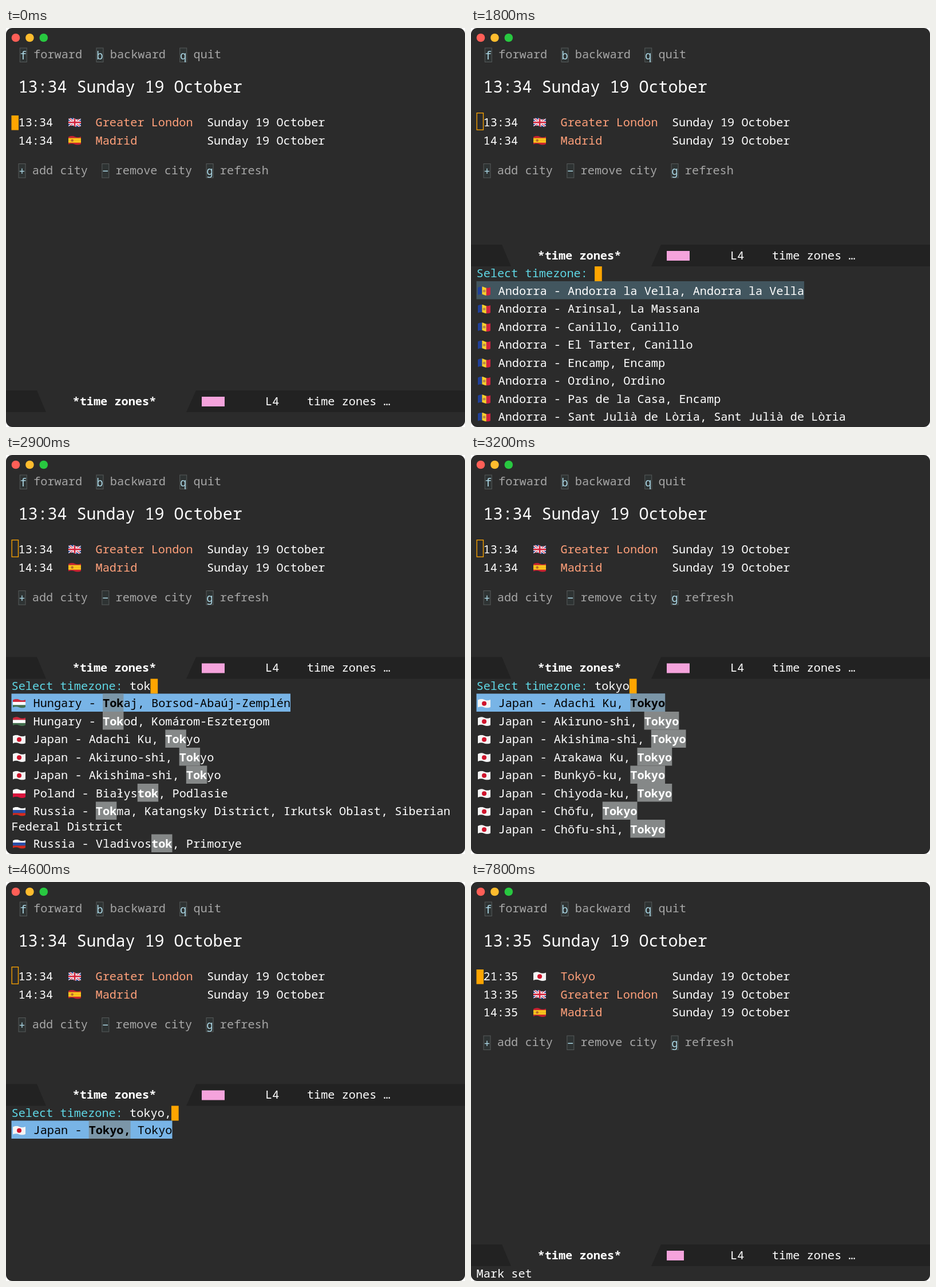
An HTML page that plays this animation: 802 px wide and 698 px high, repeating every 8000 ms.

```html
<!DOCTYPE html>
<html lang="en">
<head>
<meta charset="utf-8">
<title>Time zones</title>
<style>
  html, body { margin: 0; width: 100%; height: 100%; overflow: hidden; background: #fff; }
  svg { display: block; width: 802px; height: 698px; }
  text {
    font: 500 20.25px "Noto Sans Mono", "DejaVu Sans Mono", monospace;
    white-space: pre; fill: #fff; transform: translate(-.5px, -.8px);
  }
  .title { font-size: 28.35px; }
  .dim { fill: #a6a6a6; }
  .key { font-size: 19px; fill: #add8e6; text-anchor: middle; }
  .city { fill: #ffa07a; }
  .prompt { fill: #5fd7e5; }
  .bold { font-weight: bold; }
  .picked { fill: #000; }
</style>
</head>
<body>
<svg id="stage" viewBox="0 0 802 698"></svg>
<script>
const stage = document.getElementById('stage');
const LOOP = 8000, CHAR = 12.15, ROW = 31.5, ORANGE = '#ffa500';

const rect = (x, y, w, h, fill, extra = '') =>
  `<rect x="${x}" y="${y}" width="${w}" height="${h}" fill="${fill}" ${extra}/>`;
const text = (x, y, str, cls = '') => `<text x="${x}" y="${y}" class="${cls}">${str}</text>`;

// Flags are drawn 23 x 17, cut to a waving outline.
const stripes = (colors, vertical) => colors.map((c, i) => {
  const n = colors.length;
  return vertical ? rect(i * 23 / n, 0, 23 / n + .2, 17, c) : rect(0, i * 17 / n, 23, 17 / n + .2, c);
}).join('');
const line = (d, color, width) => `<path d="${d}" stroke="${color}" stroke-width="${width}"/>`;
const dot = (x, r, color) => `<circle cx="${x}" cy="8.5" r="${r}" fill="${color}"/>`;
const flags = {
  GB: rect(0, 0, 23, 17, '#1f3f8f') + line('M0 0 23 17M23 0 0 17', '#fff', 4) +
      line('M0 0 23 17M23 0 0 17', '#d2233c', 1.3) + line('M11.5 0V17M0 8.5H23', '#fff', 5.5) +
      line('M11.5 0V17M0 8.5H23', '#d2233c', 3),
  ES: stripes(['#c8202f', '#fbc31c', '#fbc31c', '#c8202f']) + dot(7, 2.3, '#b5662f'),
  AD: stripes(['#20409a', '#f8cf2c', '#d0233f'], true) + dot(11.5, 2.5, '#b98a4a'),
  AE: stripes(['#158043', '#fff', '#111']) + rect(0, 0, 6.5, 17, '#e0202f'),
  JP: rect(0, 0, 23, 17, '#f4f4f4') + dot(11.5, 4.2, '#d0142c'),
  AR: stripes(['#74acdf', '#fff', '#74acdf']) + dot(11.5, 2, '#f4b42d'),
  HU: stripes(['#cd2a3e', '#fff', '#436f4d']),
  PL: stripes(['#fff', '#dc143c']),
  RU: stripes(['#fff', '#2a4fa8', '#d52b1e'])
};
const flag = (x, y, code) =>
  `<g transform="translate(${x} ${y}) scale(.96)" clip-path="url(#wave)">${flags[code]}</g>`;

const country = (code, name, places) => places.map(place => [code, `${name} - ${place}`]);
const andorra = places => country('AD', 'Andorra', places);
const japan = places => country('JP', 'Japan', places.map(p => p + ', Tokyo'));
const results = {
  '': andorra(['Andorra la Vella, Andorra la Vella', 'Arinsal, La Massana', 'Canillo, Canillo',
    'El Tarter, Canillo', 'Encamp, Encamp', 'Ordino, Ordino', 'Pas de la Casa, Encamp',
    'Sant Julià de Lòria, Sant Julià de Lòria']),
  't': [...andorra(['El Tarter, Canillo', 'Sant Julià de Lòria, Sant Julià de Lòria']),
    ...country('AE', 'United Arab Emirates', ['Abu Dhabi, Abu Dhabi', 'Ajman, Ajman',
      'Al Ain City, Abu Dhabi', 'Al Batayih, Sharjah', 'Al Dhafra, Abu Dhabi', 'Al Dhaid, Sharjah'])],
  'to': country('AR', 'Argentina', ['Arroyito, Córdoba', 'Cerrito, Entre Ríos',
    'Puerto Deseado, Santa Cruz', 'Puerto Esperanza, Misiones', 'Puerto Iguazú, Misiones',
    'Puerto Madryn, Chubut', 'Tornquist, Buenos Aires', 'Tostado, Santa Fe']),
  'tok': [...country('HU', 'Hungary', ['Tokaj, Borsod-Abaúj-Zemplén', 'Tokod, Komárom-Esztergom']),
    ...japan(['Adachi Ku', 'Akiruno-shi', 'Akishima-shi']),
    ...country('PL', 'Poland', ['Białystok, Podlasie']),
    ...country('RU', 'Russia', ['Tokma, Katangsky District, Irkutsk Oblast, Siberian Federal District',
      'Vladivostok, Primorye'])],
  'tokyo': japan(['Adachi Ku', 'Akiruno-shi', 'Akishima-shi', 'Arakawa Ku', 'Bunkyō-ku',
    'Chiyoda-ku', 'Chōfu', 'Chōfu-shi']),
  'tokyo,': japan(['Tokyo'])
};

const scenes = [
  { at: 0 },
  { at: 900, echo: 'Wait...' },
  { at: 1800, query: '', bar: 379 },
  { at: 2600, query: 't', bar: 379 },
  { at: 2700, query: 'to', bar: 379 },
  { at: 2900, query: 'tok', bar: 353.5 },
  { at: 3200, query: 'tokyo', bar: 353.5 },
  { at: 3600, query: 'tokyo,', bar: 353.5 },
  { at: 5800, echo: 'Mark set', added: true }
];
const cursorOff = [[300, 800], [2300, 2600], [4100, 4600], [5100, 5600], [6300, 6800], [7300, 7800]];

function keys(x, baseline, items) {
  return items.map(([key, label]) => {
    const left = x;
    x += (label.length + 4) * CHAR;
    return rect(left, baseline - 19, 12, 24.5, '#2e3333', 'stroke="#565b5b"') +
      text(left + 6.5, baseline + 1.5, key, 'key') + text(left + 2 * CHAR, baseline, label, 'dim');
  }).join('');
}

function clocks(added) {
  const min = added ? 35 : 34;
  const cities = [[13, 'GB', 'Greater London'], [14, 'ES', 'Madrid']];
  if (added) cities.unshift([21, 'JP', 'Tokyo']);
  return text(22, 114, `13:${min} Sunday 19 October`, 'title') +
    cities.map(([hour, code, city], i) => {
      const y = 173 + i * ROW;
      return text(22, y, `${hour}:${min}`) + flag(109, y - 16, code) +
        text(157, y, city, 'city') + text(351.4, y, 'Sunday 19 October');
    }).join('') +
    keys(22, 256.5 + (cities.length - 2) * ROW,
      [['+', 'add city'], ['−', 'remove city'], ['g', 'refresh']]);
}

function modeLine(y, added) {
  return `<path d="M0 ${y}H54L70 ${y + 38}H0zM332 ${y}H802v38H315z" fill="#222"/>` +
    text(117, y + 26.5, '*time zones*', 'bold') + rect(342, y + 11, added ? 30 : 40, 17, '#f5a3dc') +
    text(453.5, y + 26.5, 'L4') + text(526.4, y + 26.5, 'time zones …');
}

function picker({ query, bar }, cursorOn) {
  const columns = 61, inputX = 10 + 17 * CHAR;
  let y = bar + 64;
  let out = text(10, bar + 58, 'Select timezone:', 'prompt') + text(inputX, bar + 58, query);
  if (cursorOn) out += rect(inputX - .5 + query.length * CHAR, bar + 38, 12.7, 26, ORANGE);
  results[query].forEach(([code, label], i) => {
    const first = i === 0, typed = query !== '';
    const start = label.toLowerCase().indexOf(query), end = start + query.length;
    if (first) out += rect(9.5, y, 38 + label.length * CHAR, ROW, typed ? '#78b4e6' : '#42565f');
    if (typed) out += rect(47.5 + start * CHAR, y, query.length * CHAR, ROW, first ? '#7b96a8' : '#858888');
    const marked = label.slice(0, start) + `<tspan class="bold">${label.slice(start, end)}</tspan>` +
      label.slice(end, columns);
    out += flag(12, y + 9, code) + text(48, y + 24.5, marked, first && typed ? 'picked' : '');
    y += ROW;
    if (label.length > columns) {
      out += text(10, y + 19.5, label.slice(columns));
      y += 25.5;
    }
  });
  return out;
}

function draw(scene, cursorOn) {
  const picking = 'query' in scene;
  let out = `<clipPath id="wave"><path d="M0 2Q6-1 11.5 1.5T23 1.5V15Q17 18 11.5 15.5T0 15.5z"/></clipPath>` +
    rect(0, 0, 802, 698, '#2b2b2b', 'rx="11"') +
    ['#ff5f57', '#febc2e', '#28c840'].map((c, i) =>
      `<circle cx="${17 + i * 24.4}" cy="17" r="7.3" fill="${c}"/>`).join('') +
    keys(24.3, 54, [['f', 'forward'], ['b', 'backward'], ['q', 'quit']]);
  if (picking) out += rect(10.2, 148.7, 11.3, 29.5, 'none', `stroke="${ORANGE}" stroke-width="1.3"`);
  else if (cursorOn) out += rect(9.5, 153, 12.5, 25.6, ORANGE);
  out += clocks(scene.added) + modeLine(scene.bar ?? 634, scene.added);
  out += picking ? picker(scene, cursorOn) : text(10, 692.5, scene.echo ?? '');
  stage.innerHTML = out;
}

let shown;
const began = performance.now();
function tick() {
  const t = (performance.now() - began) % LOOP;
  const scene = scenes.findLast(s => s.at <= t);
  const cursorOn = !cursorOff.some(([from, to]) => t >= from && t < to);
  const state = `${scene.at} ${cursorOn}`;
  if (state !== shown) draw(scene, cursorOn);
  shown = state;
  requestAnimationFrame(tick);
}
tick();
</script>
</body>
</html>
```
